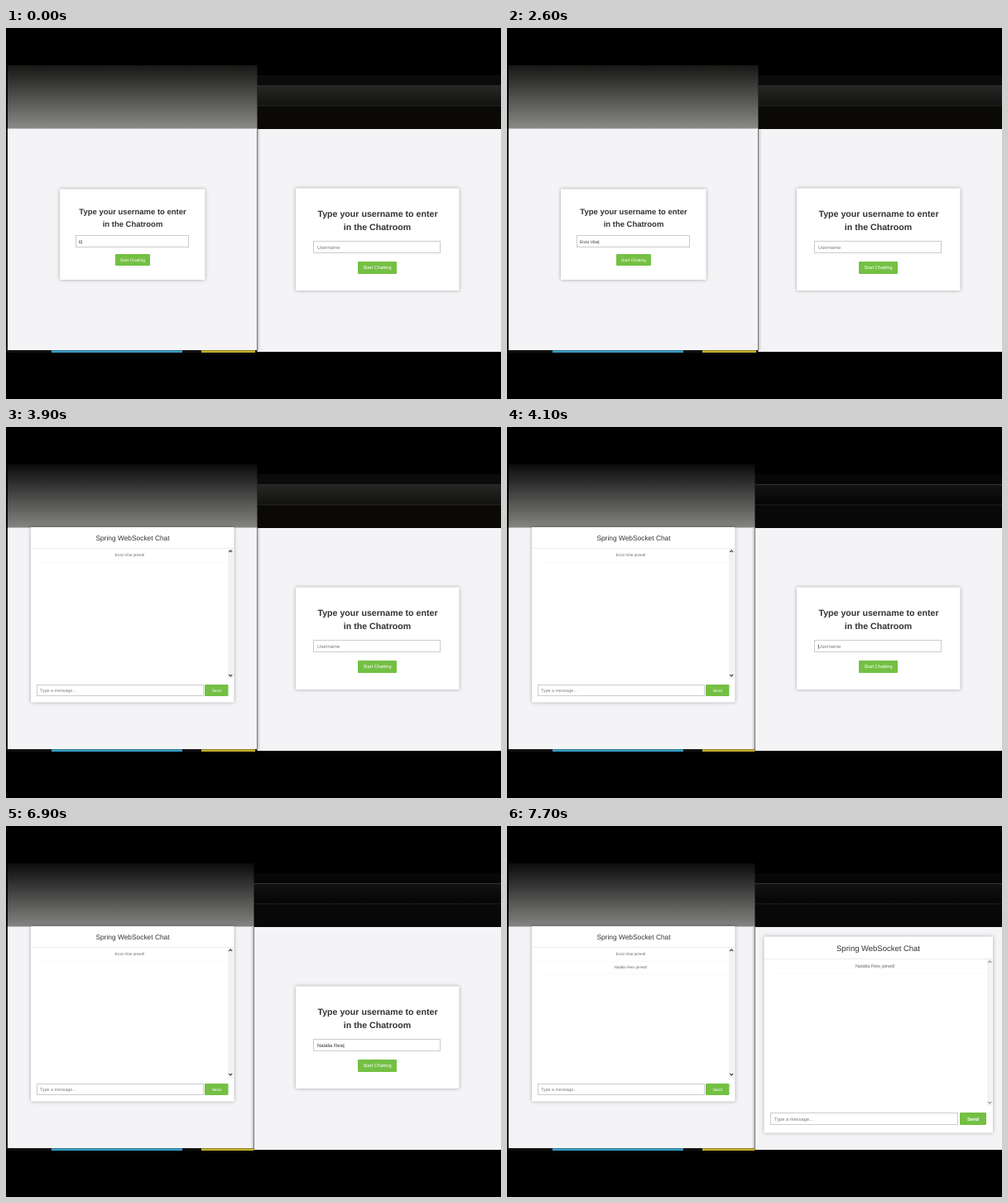
An HTML page that plays this animation: 598 px wide and 448 px high, repeating every 8 s.

```html
<!DOCTYPE html>
<html lang="en">
<head>
<meta charset="utf-8">
<title>Two chat windows</title>
<style>
  html, body { margin: 0; width: 100%; height: 100%; overflow: hidden; background: #000; }
  svg { display: block; width: 598px; height: 448px; }
  text { font-family: "Liberation Sans", Arial, sans-serif; text-rendering: geometricPrecision; white-space: pre; }
  .card { fill: #fff; filter: drop-shadow(0 .5px 2px rgba(0, 0, 0, .32)); }
</style>
</head>
<body>
<svg id="stage" viewBox="0 0 598 448"></svg>
<script>
const LOOP = 8000;
const GREEN = '#74c044';
const stage = document.getElementById('stage');

// One entry per character: the moment it is typed.
const leftUser = {
  name: 'Enzo Vilar',
  keys: [0, 100, 600, 800, 1800, 2200, 2300, 2400, 2600, 2600],
  caret: [[0, 300], [600, 1500], [1800, 2000], [2200, 2900]]
};
const rightUser = {
  name: 'Natália Reis',
  keys: [5200, 5300, 5400, 5800, 5900, 6000, 6100, 6200, 6500, 6700, 6800, 6900],
  caret: [[4100, 4700], [5200, 7100]]
};
const LEFT_ENTERS = 2900, LEFT_JOINED = 3300, FOCUS_MOVES = 4100;
const RIGHT_ENTERS = 7100, RIGHT_JOINED = 7200;

const rect = (x, y, w, h, fill, extra = '') =>
  `<rect x="${x}" y="${y}" width="${w}" height="${h}" fill="${fill}" ${extra}/>`;
const text = (x, y, size, fill, content, extra = '') =>
  `<text x="${x}" y="${y}" font-size="${size}" fill="${fill}" ${extra}>${content}</text>`;
const centered = (x, y, size, fill, content, extra = '') =>
  text(x, y, size, fill, content, 'text-anchor="middle" ' + extra);
const card = (x, y, w, h) => rect(x, y, w, h, '#fff', 'class="card" rx="1"');
const field = (x, y, w, h) => rect(x + .5, y + .5, w - 1, h - 1, '#fff', 'stroke="#ccccd0"');
const button = (x, y, w, h, size, label, extra = '') =>
  rect(x, y, w, h, GREEN, 'rx="1"') +
  centered(x + w / 2, y + h / 2 + size * .35, size, '#fff', label, extra);
const gradient = (id, ...colors) =>
  `<linearGradient id="${id}" x2="0" y2="1">${colors.map((c, i) =>
    `<stop offset="${i / (colors.length - 1)}" stop-color="${c}"/>`).join('')}</linearGradient>`;

function typedName(user, t, x, y, size) {
  const typed = user.name.slice(0, user.keys.filter(k => k <= t).length);
  const caretOn = user.caret.some(([from, to]) => t >= from && t < to);
  const caret = caretOn ? '<tspan dx="-.1em" fill="#111">|</tspan>' : '';
  if (typed) return text(x, y, size, '#333', typed + caret);
  return text(x, y, size, '#7c7c7c', 'Username') + (caretOn ? text(x, y, size, '#111', caret) : '');
}

function leftLogin(t) {
  return card(65, 194.5, 175.5, 109.5) +
    centered(153, 225, 9.47, '#333', 'Type your username to enter', 'font-weight="bold"') +
    centered(153, 240, 9.47, '#333', 'in the Chatroom', 'font-weight="bold"') +
    field(84, 250, 137, 15) +
    typedName(leftUser, t, 88, 259.8, 5) +
    button(132, 273, 42, 14, 4.9, 'Start Chatting');
}

function rightLogin(t) {
  return card(350, 193.5, 197.5, 123.5) +
    centered(449, 227.8, 10.64, '#333', 'Type your username to enter', 'font-weight="bold"') +
    centered(448.5, 244.3, 10.64, '#333', 'in the Chatroom', 'font-weight="bold"') +
    field(371, 257, 154, 15) +
    typedName(rightUser, t, 376, 266.5, 5.9) +
    button(425, 282, 47, 15, 5.6, 'Start Chatting');
}

function scrollbar(x, top, bottom, color) {
  const arrow = (y, dir) =>
    `<path d="M${x + 1.2} ${y + dir}l2 ${-2 * dir}l2 ${2 * dir}" fill="none" stroke="${color}" stroke-width="1.1"/>`;
  return rect(x, top, 6.5, bottom - top, '#f3f3f4') + arrow(top + 3, 1) + arrow(bottom - 4, -1);
}

function messages(list, x, y, step, size, left, width) {
  return list.map((name, i) =>
    centered(x, y + i * step, size, '#666', name + ' joined!') +
    rect(left, y + i * step + 6.5, width, .7, '#f5f5f6')).join('');
}

function leftChat(t) {
  const joined = [];
  if (t >= LEFT_JOINED) joined.push(leftUser.name);
  if (t >= RIGHT_JOINED) joined.push(rightUser.name);
  return card(30, 121, 245.5, 211.5) +
    centered(153, 137.4, 8.4, '#333', 'Spring WebSocket Chat') +
    rect(30, 146, 245, 1, '#ececee') +
    scrollbar(268, 147, 304, '#444') +
    messages(joined, 149.5, 156.4, 15.6, 4.65, 38, 229) +
    field(37, 311, 202, 14) +
    text(41, 320, 5.35, '#7c7c7c', 'Type a message...') +
    button(240, 311, 28.5, 14, 4.8, 'Send');
}

function rightChat(t) {
  const joined = t >= RIGHT_JOINED ? [rightUser.name] : [];
  return card(310.5, 133.5, 276.5, 237) +
    centered(448.5, 150.5, 9.47, '#333', 'Spring WebSocket Chat') +
    rect(311, 160, 276, 1, '#ececee') +
    scrollbar(580, 161, 338, '#999') +
    messages(joined, 445, 171.3, 17, 5.55, 320, 259) +
    field(318, 346, 227, 15) +
    text(323, 355.6, 5.75, '#7c7c7c', 'Type a message...') +
    button(547, 346, 32, 15, 5.8, 'Send', 'font-weight="bold"');
}

function rightWindow(t, edge, focused) {
  const w = 598 - edge;
  return rect(edge, 57, w, 12, focused ? '#070707' : '#0b0b0b') +
    rect(edge, 69, w, 25, 'url(#toolbar)') +
    rect(edge, 69, w, 1, focused ? '#333' : '#2c2c2a') +
    rect(edge, 93.5, w, 1, focused ? '#242424' : '#2a2a28') +
    rect(edge, 95, w, 27, focused ? '#080808' : '#0b0906') +
    rect(edge, 122, w, 269, '#f4f3f6') +
    (t < RIGHT_ENTERS ? rightLogin(t) : rightChat(t));
}

function leftWindow(t, edge) {
  const w = edge - 2;
  return rect(2, 45, w, 77, 'url(#header)') +
    rect(2, 121.5, w, 267.5, '#f4f3f6') +
    (t < LEFT_ENTERS ? leftLogin(t) : leftChat(t)) +
    rect(2, 389, w, 3, '#111') +
    rect(55, 389.3, 158, 2.7, '#3b9fc6') +
    rect(236, 389.3, Math.min(edge, 301) - 236, 2.7, '#c5b02c');
}

function scene(t) {
  const focused = t >= FOCUS_MOVES;
  const edge = focused ? 299.5 : 303.5;
  const header = t < LEFT_ENTERS ? ['#171716', '#50504e', '#8b8b89'] : ['#0b0b0b', '#484847', '#858583'];
  const toolbar = focused ? ['#131313', '#050505'] : ['#272725', '#121211'];
  const shadow = focused
    ? rect(edge - 4, 122, 4, 267, 'url(#edge)', `transform="translate(0 0)"`)
    : rect(edge, 122, 4, 267, 'url(#edge)', `transform="translate(${2 * edge + 4} 0) scale(-1 1)"`);
  return `<defs>${gradient('header', ...header)}${gradient('toolbar', ...toolbar)}
    <linearGradient id="edge"><stop stop-color="#000" stop-opacity="0"/>
    <stop offset="1" stop-color="#000" stop-opacity=".22"/></linearGradient></defs>` +
    rect(0, 0, 598, 448, '#000') +
    rect(0, 122, 2, 268, '#18181a') +
    rightWindow(t, edge, focused) +
    leftWindow(t, edge) +
    shadow +
    rect(edge - .5, 122, 1, 269, '#777');
}

// The picture only changes on tenths of a second.
let shown = -1;
function frame(now) {
  const t = Math.floor(now % LOOP / 100) * 100;
  if (t !== shown) {
    stage.innerHTML = scene(t);
    shown = t;
  }
  requestAnimationFrame(frame);
}
frame(performance.now());
</script>
</body>
</html>
```
